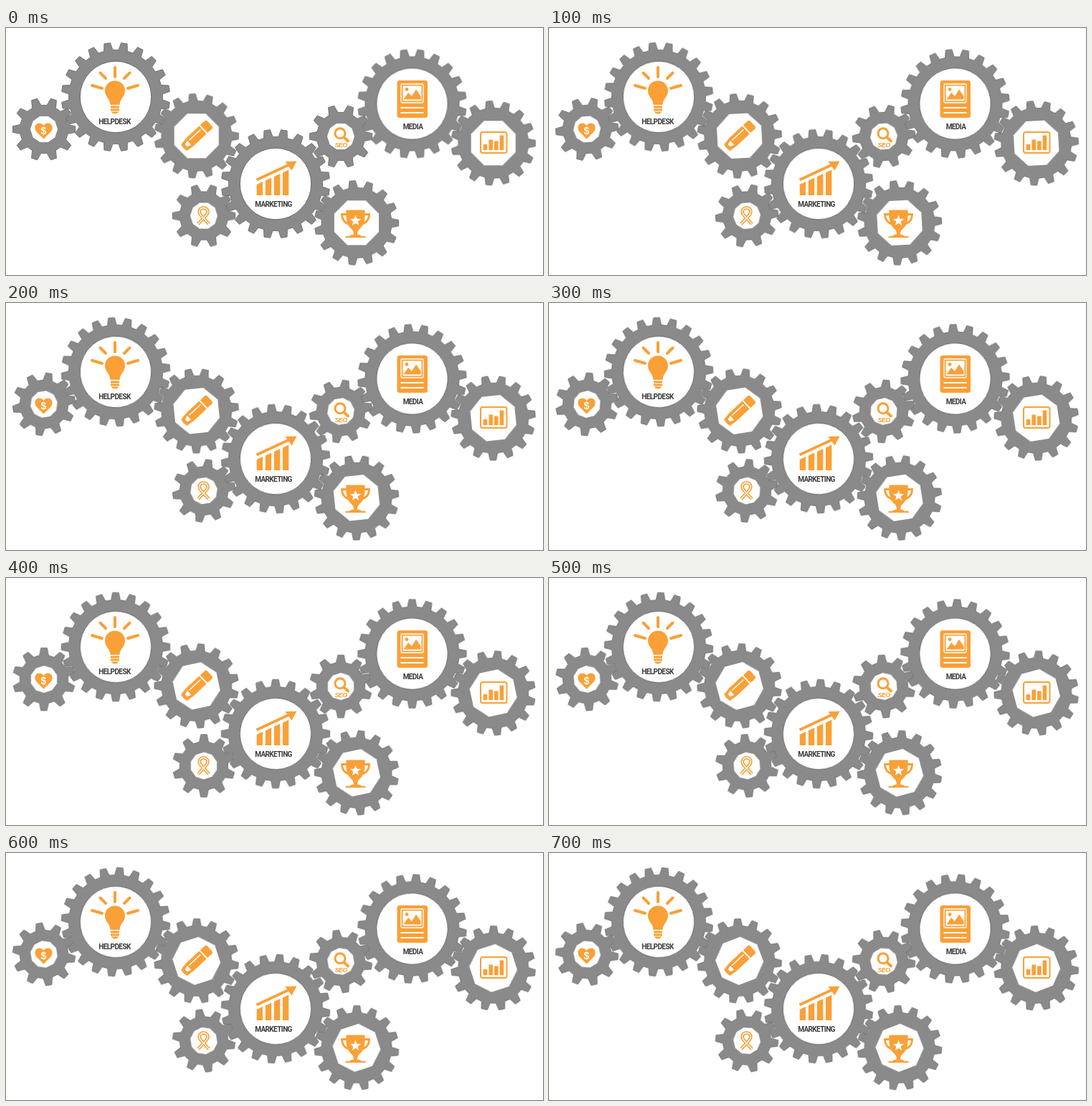
Recreate the animation shown at these times as an HTML page. Size 749x344 px, loop 0.8 s.

```html
<!DOCTYPE html>
<html lang="en">
<head>
<meta charset="utf-8">
<title>Turning gears</title>
<style>
  html, body { margin: 0; width: 100%; height: 100%; overflow: hidden; background: #fff; }
  svg { display: block; width: 749px; height: 344px; }
  .gear { fill: #8a8a8a; stroke: #6e6e6e; stroke-width: .9; stroke-linejoin: round; }
  .hole { fill: #fff; }
  .spin { transform-origin: 0 0; animation: spin .8s steps(8, end) infinite; }
  @keyframes spin { to { transform: rotate(var(--turn)); } }
  .fill { fill: #faa037; }
  .line { fill: none; stroke: #faa037; }
  .white { fill: #fff; }
  .cut { fill: none; stroke: #fff; }
  text { font-family: "Liberation Sans", Arial, sans-serif; font-weight: bold; text-anchor: middle; }
  .label { font-family: Roboto, Arial, sans-serif; font-size: 10px; letter-spacing: -.6px; fill: #3b3b3b; }
</style>
</head>
<body>
<svg viewBox="0 0 749 344" xmlns="http://www.w3.org/2000/svg">
  <g id="gears"></g>

  <!-- bulb -->
  <path class="fill" d="M152 73.500C144 73.500 138 79.500 138 87.500C138 96 145 98 145.500 107H158.500C159 98 166 96 166 87.500C166 79.500 160 73.500 152 73.500Z"/>
  <path class="fill" d="M146 108.500H158V111.500H146ZM146 112.500H158V115.500H146ZM147 116.500H157Q156 119.500 152 119.500Q148 119.500 147 116.500Z"/>
  <path class="line" stroke-width="4" stroke-linecap="round" d="M120 80L134 84M131.500 62.500L139 70M152 55V68M172.500 62.500L165 70M184 80L170 84"/>
  <text class="label" x="151.500" y="134">HELPDESK</text>

  <!-- heart -->
  <path class="fill" d="M52.500 154.500L42.500 144.500C38.500 140 40.500 132.500 46.500 132.500Q50.500 132.500 52.500 136Q54.500 132.500 58.500 132.500C64.500 132.500 66.500 140 62.500 144.500Z"/>
  <text class="white" x="52.500" y="148" font-size="14">$</text>

  <!-- pencil -->
  <g transform="translate(266.500 149.500) rotate(-43)">
    <path class="fill" d="M-26 0L-25 -6L-14 -7.500H11V7.500H-14L-25 6ZM13 -7.500H21Q24 -7.500 24 -4.500V4.500Q24 7.500 21 7.500H13Z"/>
    <path class="cut" stroke-width="1.500" d="M-13 -2.500H9"/>
    <path class="white" d="M-15 -4L-21 -2V2L-15 4Z"/>
  </g>

  <!-- growth -->
  <path class="fill" d="M349.700 218L358 214V233H349.700ZM361.800 212.500L370.200 208.500V233H361.800ZM373.900 207L382.300 203V233H373.900ZM386 201.500L394.300 197.500V233H386Z"/>
  <path class="line" stroke-width="3.600" d="M349.500 211.500L398 189"/>
  <path class="fill" d="M405.500 185.500L389.500 186L398.500 198.500Z"/>
  <text class="label" x="373" y="249">MARKETING</text>

  <!-- ribbon -->
  <g id="ribbon"></g>

  <!-- search -->
  <circle class="line" stroke-width="3" cx="466" cy="146.800" r="7"/>
  <path class="line" stroke-width="4" stroke-linecap="round" d="M471.800 152.600L477 157.500"/>
  <text class="fill" x="467" y="166" font-size="9" font-style="italic" letter-spacing="-.7">SEO</text>

  <!-- media -->
  <rect class="fill" x="545.500" y="73" width="42.500" height="52" rx="3.500"/>
  <rect class="cut" stroke-width="1.300" x="551" y="78" width="31" height="26" rx="1.500"/>
  <rect class="white" x="553.500" y="80.500" width="26" height="21"/>
  <path class="fill" d="M554.500 99.500L561 90L566 95L572 85.500L578.500 95V99.500Z"/>
  <circle class="fill" cx="559" cy="85.500" r="2.400"/>
  <path class="cut" stroke-width="2" d="M550.500 111H582.500M550.500 118H582.500"/>
  <text class="label" x="567.500" y="141">MEDIA</text>

  <!-- statistics -->
  <rect class="line" stroke-width="2" x="662" y="145" width="36.500" height="29" rx="3"/>
  <path class="fill" d="M665.700 162H671.300V170H665.700ZM673.400 155.500H679V170H673.400ZM681 157.500H686.600V170H681ZM688.600 149.500H694.200V170H688.600Z"/>

  <!-- trophy -->
  <path class="fill" d="M474.500 253.500H500.500Q502 273 493 280Q490 282.500 490 287.500Q495 288 496 290H501.500V292H473.500V290H479Q480 288 485 287.500Q485 282.500 482 280Q473 273 474.500 253.500Z"/>
  <path class="line" stroke-width="2.800" d="M476 259.500H468.500Q468.500 270.500 480 273.500M499 259.500H506.500Q506.500 270.500 495 273.500"/>
  <path class="white" id="star"/>
</svg>

<script>
const $ = id => document.getElementById(id);

// Polar degrees are measured clockwise from straight up.
function polar(r, deg) {
  const a = deg * Math.PI / 180;
  return (r * Math.sin(a)).toFixed(2) + " " + (-r * Math.cos(a)).toFixed(2);
}

const shape = pts => "M" + pts.join("L") + "Z";

function polygon(n, r) {
  return shape(Array.from({ length: n }, (_, i) => polar(r, (i + .5) * 360 / n)));
}

function teeth({ n, tip, root, phase, top, base }) {
  const pts = [], deg = 180 / Math.PI;
  for (let i = 0; i < n; i++) {
    const a = phase + i * 360 / n;
    const t = top / tip * deg, b = base / root * deg;
    pts.push(polar(root, a - b), polar(tip, a - t), polar(tip, a + t), polar(root, a + b));
  }
  return shape(pts);
}

const big = { n: 20, tip: 75.7, root: 65.5, phase: -9, top: 4.3, base: 6.3, dir: 1 };
const mid = { n: 15, tip: 58.8, root: 49, phase: -5.7, top: 4.2, base: 6.2, dir: -1, sides: 8, hole: 33.6 };
const small = { n: 10, tip: 43.8, root: 33.8, phase: -18, top: 4.2, base: 6.5, dir: -1, sides: 10, hole: 19 };

const gears = [
  [small, 53, 141], [small, 276, 261.5], [small, 467, 151],
  [mid, 265.7, 150.3], [mid, 489, 271.3], [mid, 679.7, 160.3],
  [big, 153, 96], [big, 376, 217], [big, 566.5, 105.5]
];

$("gears").innerHTML = gears.map(([g, x, y]) => {
  const hole = g.sides
    ? `<path class="hole" d="${polygon(g.sides, g.hole)}"/>`
    : `<circle class="hole" stroke="#666" r="49.800"/>`;
  return `<g transform="translate(${x} ${y})">
    <g class="spin" style="--turn:${g.dir * 360 / g.n}deg">
    <path class="gear" d="${teeth(g)}"/>${hole}</g></g>`;
}).join("");

const loop = "M268 273L279 261C283.500 256 281 250.500 275.500 250.500C270 250.500 267.500 256 272 261L283 273";
$("ribbon").innerHTML =
  `<path class="line" stroke-width="4.600" d="${loop}"/><path class="cut" stroke-width="1.300" d="${loop}"/>`;

$("star").setAttribute("d", shape(Array.from({ length: 10 }, (_, i) => polar(i % 2 ? 3.3 : 8, i * 36))));
$("star").setAttribute("transform", "translate(487.500 268.500)");
</script>
</body>
</html>
```
